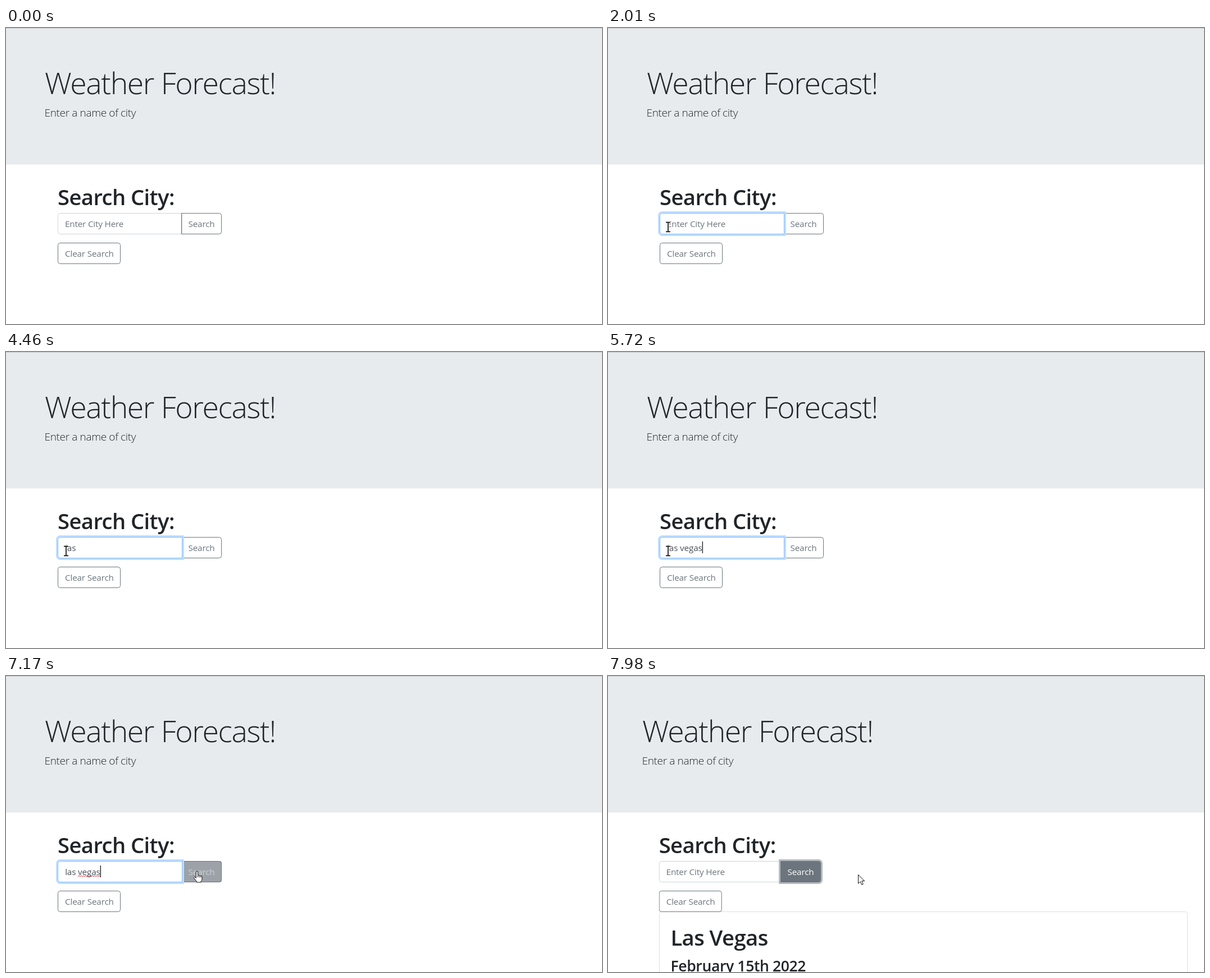
Write an HTML page that moves like this. It is 1061x528 px and loops after 8 s.

```html
<!DOCTYPE html>
<html lang="en">
<head>
<meta charset="utf-8">
<title>Weather Forecast</title>
<style>
  html, body { margin: 0; width: 100%; height: 100%; overflow: hidden; background: #fff; }
  svg { display: block; width: 100%; height: 100%; }
  text { font-family: "Open Sans", "Noto Sans", sans-serif; letter-spacing: -.015em; fill: #212529; white-space: pre; }
  .display { font-size: 53.6px; font-weight: 300; letter-spacing: -.027em; }
  .lead { font-size: 19.1px; font-weight: 300; letter-spacing: -.02em; }
  .h1 { font-size: 38.2px; font-weight: 600; }
  .h3 { font-size: 26.6px; font-weight: 600; }
  .ui { font-size: 15.3px; fill: #6c757d; letter-spacing: -.012em; }
  #typed { fill: #495057; }
  .line { fill: none; stroke: #6c757d; }

  /* One 8 s loop: 1% = 80 ms */
  .header { animation: header 8s step-end infinite; }
  .main { animation: main 8s step-end infinite; }
  .search { animation: search 8s step-end infinite; }
  .card { animation: card 8s step-end infinite; }
  .result { animation: result 8s step-end infinite; }
  .wave { animation: wave 8s step-end infinite; }
  .glow { animation: glow 8s linear infinite; }
  .fill { animation: fill 8s linear infinite; }
  .label { animation: label 8s linear infinite; }
  .ring { animation: ring 8s linear infinite; }
  .cursor { animation: move 8s linear infinite; }
  .arrow { animation: arrow 8s step-end infinite; }
  .beam { animation: beam 8s step-end infinite; }
  .hand { animation: hand 8s step-end infinite; }

  @keyframes header { 0% { transform: none; } 93%, 100% { transform: translate(-8px, 0); } }
  @keyframes main { 0% { transform: none; } 93%, 100% { transform: translate(-1.3px, 0); } }
  @keyframes search { 0% { transform: none; } 93%, 100% { transform: translate(-3.7px, 0); } }
  @keyframes card {
    0% { opacity: 0; height: 83px; }
    93% { opacity: 1; height: 83px; }
    97.125%, 100% { opacity: 1; height: 200px; }
  }
  @keyframes result { 0% { opacity: 0; } 97.125%, 100% { opacity: 1; } }
  @keyframes wave { 0% { opacity: 0; } 81.375% { opacity: 1; } 93%, 100% { opacity: 0; } }
  @keyframes glow { 0%, 18.5% { opacity: 0; } 20.6%, 92.25% { opacity: 1; } 93.75%, 100% { opacity: 0; } }
  @keyframes fill { 0%, 88.4% { opacity: 0; } 90.25%, 100% { opacity: 1; } }
  @keyframes label { 0%, 88.4% { fill: #6c757d; } 90.25%, 100% { fill: #fff; } }
  @keyframes ring { 0%, 92.25% { opacity: 0; } 93.75%, 100% { opacity: 1; } }

  @keyframes move {
    0%, 2.25% { transform: translate(980px, 512px); }
    5% { transform: translate(700px, 506px); }
    8% { transform: translate(250px, 498px); }
    9.9% { transform: translate(25px, 490px); }
    10.6% { transform: translate(16px, 478px); }
    11.5% { transform: translate(58px, 419px); }
    15%, 16% { transform: translate(101px, 360px); }
    18.5%, 80.7% { transform: translate(107px, 355px); }
    83.75% { transform: translate(160px, 365px); }
    85.6% { transform: translate(230px, 371px); }
    87.25% { transform: translate(300px, 366px); }
    88.1% { transform: translate(325px, 357px); }
    89.5%, 96.3% { transform: translate(340px, 348px); }
    99.75%, 100% { transform: translate(445px, 354px); }
  }
  @keyframes arrow {
    0% { opacity: 0; } 2.25% { opacity: 1; } 14.6% { opacity: 0; }
    85% { opacity: 1; } 86.6% { opacity: 0; } 97.9%, 100% { opacity: 1; }
  }
  @keyframes beam {
    0% { opacity: 0; } 14.6% { opacity: 1; } 85% { opacity: 0; }
    86.6% { opacity: 1; } 87.8%, 100% { opacity: 0; }
  }
  @keyframes hand { 0% { opacity: 0; } 87.8% { opacity: 1; } 97.9%, 100% { opacity: 0; } }
</style>
</head>
<body>
<svg viewBox="0 0 1061 528" preserveAspectRatio="none">
  <rect width="1061" height="243.5" fill="#e8ebee"/>
  <rect width="1061" height="1" fill="#c3c7ca"/>
  <g class="header">
    <text class="display" x="69" y="118">Weather Forecast!</text>
    <text class="lead" x="68.5" y="158">Enter a name of city</text>
  </g>

  <rect class="card" x="91.5" y="420.5" width="940" height="83" rx="4" fill="#fff" stroke="#dfdfdf"/>
  <g class="result">
    <text class="h1" x="111.5" y="481">Las Vegas</text>
    <text class="h3" x="111.5" y="526.5">February 15th 2022</text>
  </g>

  <g class="main">
    <text class="h1" x="92" y="316">Search City:</text>
    <path d="M313.5 330.5H96.5a4 4 0 0 0-4 4V363.5a4 4 0 0 0 4 4H313.5z" fill="#fff" stroke="#ced4da"/>
    <g class="search">
      <path class="line" d="M312.5 330.5H379.5a4 4 0 0 1 4 4V363.5a4 4 0 0 1-4 4H312.5z"/>
      <path class="fill" d="M312 330H380a4 4 0 0 1 4 4V364a4 4 0 0 1-4 4H312z" fill="#6c757d"/>
      <path class="ring" d="M310.5 328.5H380a5.5 5.5 0 0 1 5.5 5.5V364a5.5 5.5 0 0 1-5.5 5.5H310.5z" fill="none" stroke="#b5babe" stroke-width="3"/>
      <text class="ui label" x="324.5" y="355">Search</text>
    </g>
    <g class="glow">
      <path d="M315.5 328.5H96.5a6 6 0 0 0-6 6V363.5a6 6 0 0 0 6 6H315.5z" fill="none" stroke="#bfdeff" stroke-width="3"/>
      <path d="M313.5 330.5H96.5a4 4 0 0 0-4 4V363.5a4 4 0 0 0 4 4H313.5z" fill="#fff" stroke="#80bdff"/>
    </g>
    <text class="ui" id="hint" x="104.9" y="355">Enter City Here</text>
    <text class="ui" id="typed" x="105.2" y="355"></text>
    <path class="wave" id="wave" fill="none" stroke="#e0393e"/>
    <rect id="caret" y="338" width="1.4" height="21" fill="#23272b"/>
    <rect class="line" x="92.5" y="383.5" width="111" height="37" rx="4"/>
    <text class="ui" x="105" y="408">Clear Search</text>
  </g>

  <g class="cursor">
    <g class="arrow">
      <path d="M.5 .5V16.2l3.7-3.5 2.5 5.6 2.5-1.1-2.4-5.5h4.9z" fill="#fff" stroke="#111"/>
    </g>
    <g class="beam" fill="none">
      <path d="M-4-8.3H4M-4 8.3H4M0-8.3V8.3" stroke="#fff" stroke-width="3.6"/>
      <path d="M-4-8.3H4M-4 8.3H4M0-8.3V8.3" stroke="#111" stroke-width="1.7"/>
    </g>
    <g class="hand">
      <path d="M-1.6 12V2a1.6 1.6 0 0 1 3.2 0V7.4q1.6-1.2 2.7.5q1.6-.9 2.5.6q2.2-.5 2.2 1.9V14q0 2.6-1.9 4.3V20H-.6V18.5L-5.2 12.6q-.8-1.7.8-2.1q1.2-.1 2.8 1.9z" fill="#fff" stroke="#111"/>
      <path d="M1.6 7.5V11M4.3 8V11.3M6.8 8.6V11.6" fill="none" stroke="#111"/>
    </g>
  </g>
</svg>
<script>
  const LOOP = 8000, CLEARED = 7440, TEXT_X = 105.2;
  const CITY = "las vegas";
  const keys = [3400, 3670, 3800, 3930, 4740, 4860, 5060, 5650, 5720];
  const blinks = [1480, 2010, 2540, 3080, 3400, 4460, 4740, 5580, 5650, 6250, 6780, 7310];
  const [hint, typed, caret, wave] =
    ["hint", "typed", "caret", "wave"].map(id => document.getElementById(id));

  wave.setAttribute("d", "M128 358" + "l2-2 2 2".repeat(10));

  const passed = (times, t) => times.filter(at => at <= t).length;
  const show = (el, on) => el.setAttribute("visibility", on ? "visible" : "hidden");

  let start;
  function draw(now) {
    start ??= now;
    const t = (now - start) % LOOP;
    const text = t < CLEARED ? CITY.slice(0, passed(keys, t)) : "";
    if (typed.textContent !== text) typed.textContent = text;
    show(hint, !text);
    show(caret, passed(blinks, t) % 2 === 1);
    caret.setAttribute("x", TEXT_X + (text ? typed.getComputedTextLength() : 0));
    requestAnimationFrame(draw);
  }
  requestAnimationFrame(draw);
</script>
</body>
</html>
```
